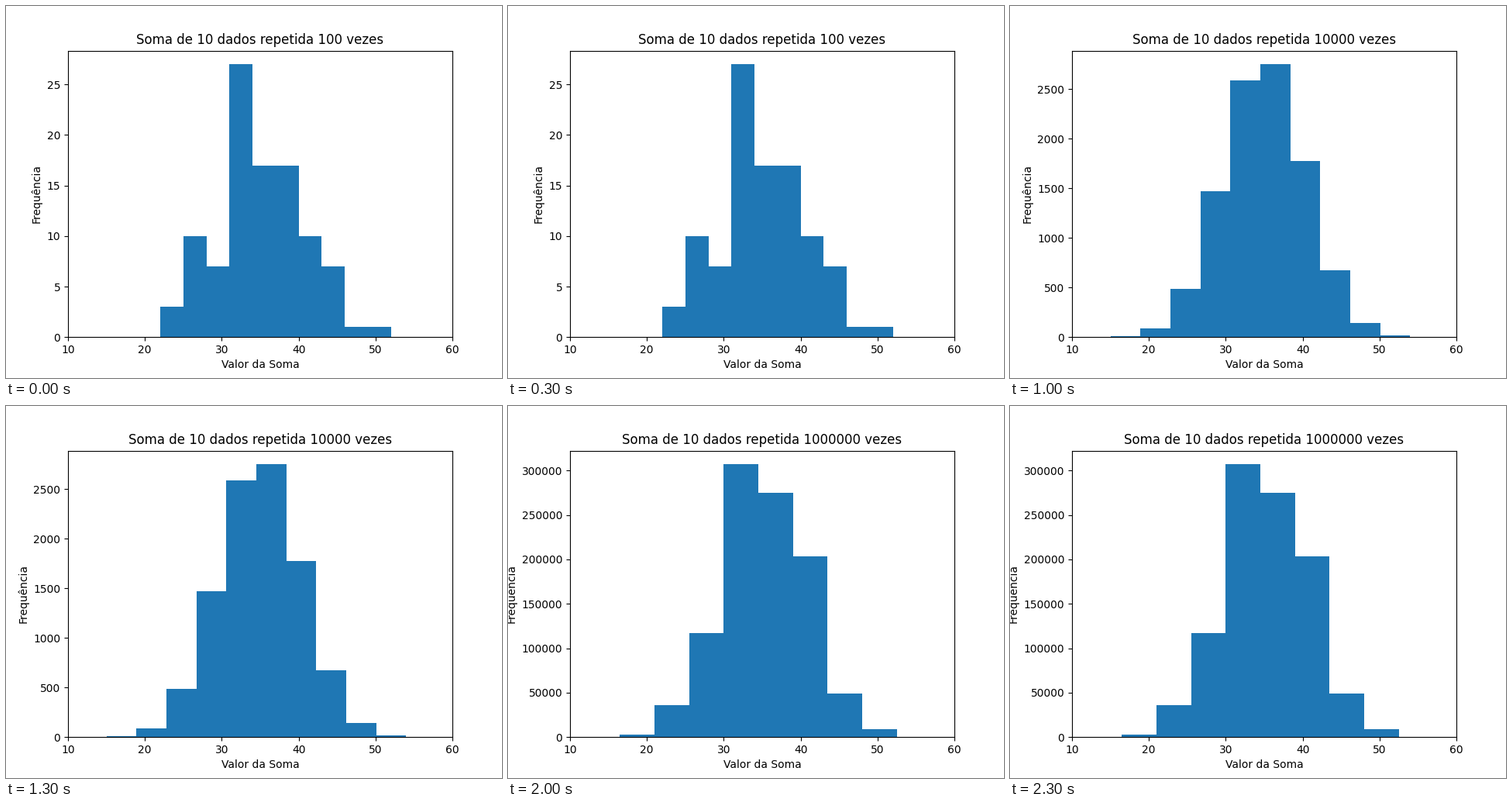
Write a matplotlib script that moves like this. It is 640 by 480 pixels and loops after 2500 ms.

```python
import numpy as np
import matplotlib.pyplot as plt
from matplotlib.animation import FuncAnimation

DICE, BINS = 10, 10
SPANS = [(22, 52), (18, 53), (15, 54), (14, 56), (12, 57)]  # lowest and highest sum

# The short runs scatter by chance; the longer ones follow the exact odds.
SCATTER = {
    100: [3, 10, 7, 27, 17, 17, 10, 7, 1, 1],
    1000: [8, 22, 93, 176, 284, 203, 141, 52, 20, 1],
}


def dice_odds():
    """Odds of every possible sum, by adding one die at a time."""
    odds = np.ones(1)
    for _ in range(DICE):
        odds = np.convolve(odds, np.ones(6) / 6)
    return odds


SUMS = np.arange(DICE, 6 * DICE + 1)
ODDS = dice_odds()


def sample(rolls, low, high):
    """Values and how often each one occurs."""
    if rolls in SCATTER:
        half = (high - low) / BINS / 2
        return np.linspace(low + half, high - half, BINS), SCATTER[rolls]
    return SUMS, rolls * ODDS


fig, ax = plt.subplots(figsize=(6.4, 4.8), dpi=100)


def draw(i):
    rolls = 10 ** (i + 2)
    values, counts = sample(rolls, *SPANS[i])
    ax.clear()
    ax.hist(values, bins=BINS, range=SPANS[i], weights=counts)
    ax.set_xlim(10, 60)
    ax.set_title(f"Soma de {DICE} dados repetida {rolls} vezes")
    ax.set_xlabel("Valor da Soma")
    ax.set_ylabel("Frequência")


anim = FuncAnimation(fig, draw, frames=len(SPANS), interval=500, repeat=True)
plt.show()
```
